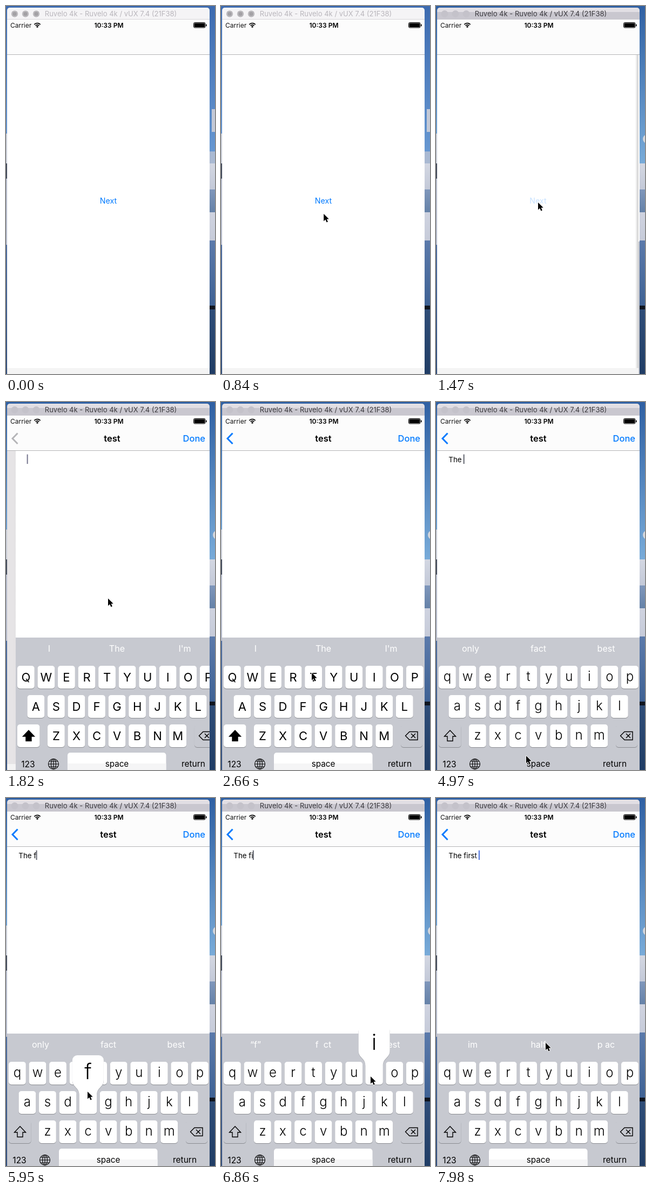
Recreate the animation shown at these times as an HTML page with a canvas. Size 387 by 678 pixels, loop 8 s.

```html
<!DOCTYPE html>
<html lang="en">
<head>
<meta charset="utf-8">
<title>Typing demo</title>
<style>
html, body { margin: 0; width: 100%; height: 100%; overflow: hidden; background: #3d6bb0; }
canvas { display: block; }
</style>
</head>
<body>
<canvas id="stage" width="387" height="678"></canvas>
<script>
const ctx = document.getElementById('stage').getContext('2d');
const LOOP = 8000, STEP = 70;
const BLUE = '#007aff', BOARD = '#c7c9d0', EDGE = '#8b8d92';
const FONT = 'Inter, Roboto, sans-serif';
const TITLE = 'Ruvelo 4k - Ruvelo 4k / vUX 7.4 (21F38)';

const clamp = v => Math.max(0, Math.min(1, v));
const ramp = (t, a, b) => clamp((t - a) / (b - a));
const ease = v => v * v * (3 - 2 * v);
const between = (t, a, b) => t >= a && t < b;
const latest = (list, t) => list.filter(e => e[0] <= t).pop();

// pointer: time, x, y of the tip
const path = [
  [70, 168, 1], [350, 191, 398], [560, 191, 398], [1190, 189, 362],
  [2310, 189, 362], [2600, 168, 499], [3150, 168, 499], [3430, 224, 546],
  [3570, 224, 546], [3780, 93, 506], [3990, 93, 506], [4410, 167, 652],
  [5390, 167, 652], [5740, 151, 541], [6230, 151, 541], [6650, 277, 513],
  [7070, 277, 513], [7490, 203, 451]
];
// held keys: from, to, letter
const presses = [
  [2730, 2940, 'T'], [3430, 3570, 'h'], [3780, 3920, 'e'],
  [5810, 6020, 'f'], [6720, 6930, 'i']
];
const typed = [
  [0, ''], [2870, 'T'], [3500, 'Th'], [3850, 'The'], [4410, 'The '],
  [5950, 'The f'], [6790, 'The fi'], [7700, 'The first ']
];
const hints = [
  [0, 'I', 'The', "I'm"], [3010, '“T”', 'The', 'This'],
  [3570, '“Th”', 'The', 'This'], [3920, '“The”', 'They', 'Then'],
  [4410, 'only', 'fact', 'best'], [6090, '“f”', 'f  ct', 'best'],
  [7000, '“fi”', 'first', 'find'], [7770, 'im', 'half', 'p ac']
];
const caretOff = [[2310, 2870], [4410, 4690], [5460, 5950], [7420, 7700]];

const rows = [['QWERTYUIOP', 5, 486], ['ASDFGHJKL', 23.5, 540], ['ZXCVBNM', 61, 594]];
const keys = rows.flatMap(([letters, x, y]) =>
  [...letters].map((letter, i) => ({ letter, x: x + 37.55 * i, y })));

function text(s, x, y, size, color, weight = 400, align = 'center') {
  ctx.font = `${weight} ${size}px ${FONT}`;
  ctx.textAlign = align;
  ctx.fillStyle = color;
  ctx.fillText(s, x, y);
}

function rect(x, y, w, h, color) {
  ctx.fillStyle = color;
  ctx.fillRect(x, y, w, h);
}

function round(x, y, w, h, r, color) {
  ctx.fillStyle = color;
  ctx.beginPath();
  ctx.roundRect(x, y, w, h, r);
  ctx.fill();
}

function line(points, color, width, close) {
  ctx.beginPath();
  points.forEach(([x, y]) => ctx.lineTo(x, y));
  if (close) ctx.closePath();
  ctx.strokeStyle = color;
  ctx.lineWidth = width;
  ctx.stroke();
}

function disc(x, y, r, color) {
  ctx.fillStyle = color;
  ctx.beginPath();
  ctx.arc(x, y, r, 0, 7);
  ctx.fill();
}

// a band whose colour runs from one tone to another
function band(x, w, y1, y2, from, to = from) {
  const g = ctx.createLinearGradient(0, y1, 0, y2);
  g.addColorStop(0, from);
  g.addColorStop(1, to);
  rect(x, y1, w, y2 - y1, g);
}

function wallpaper(active) {
  band(0, 387, 0, 290, active ? '#2f60a3' : '#3d6bb0', active ? '#78abd9' : '#6a9bd4');
  if (!active) {
    band(381, 6, 190, 232, '#c3c9d6');
    band(377, 10, 268, 290, '#a9b9d2');
  } else {
    disc(391, 245, 8, '#d3d6dc');
  }
  band(377, 10, 290, 338, '#d3d7e2', '#c3c9d8');
  band(377, 10, 338, 380, '#7f97bb', '#6582a8');
  band(377, 10, 380, 432, '#cfd3e0', '#c6cbd9');
  band(377, 10, 432, 552, '#5b7aab', '#3f6294');
  band(377, 10, 552, 559, '#10151f');
  band(377, 10, 559, 678, '#2f4d78', '#203d65');
  band(0, 2, 235, 290, '#c8ccd6');
  band(0, 2, 290, 318, '#404858');
  band(0, 2, 318, 440, '#b3b9c9');
  band(0, 2, 440, 678, '#4a6a9d', '#2d4a78');
}

function titleBar(active) {
  if (active) {
    rect(2, 3, 375, 8, '#e2dfe4');
    rect(2, 11, 375, 14, '#c9c7cf');
  } else {
    rect(2, 3, 375, 22, '#f5f4f6');
    rect(2, 24, 375, 1, '#d8d6da');
  }
  for (const x of [16, 36, 56]) {
    if (active) {
      disc(x, 14.5, 6.5, '#c4c2ca');
    } else {
      disc(x, 14.5, 6, '#a9a7ab');
      disc(x, 14.5, 5, '#d0ced2');
      disc(x, 14.5, 4, '#a3a1a5');
    }
  }
  text(TITLE, 194, 19, 13, active ? '#3b393e' : '#b9b6bc');
}

function statusBar() {
  text('Carrier', 8, 40, 12, '#111', 400, 'left');
  ctx.strokeStyle = '#000';
  ctx.lineWidth = 1.7;
  for (const r of [4.6, 7.8]) {
    ctx.beginPath();
    ctx.arc(58, 39.5, r, -Math.PI * 0.76, -Math.PI * 0.24);
    ctx.stroke();
  }
  disc(58, 38.2, 1.6, '#000');
  text('10:33 PM', 190.5, 39.5, 12, '#000', 600);
  ctx.lineWidth = 1;
  ctx.beginPath();
  ctx.roundRect(347.5, 30.5, 21.5, 9.5, 2);
  ctx.stroke();
  round(348.5, 31.5, 19.5, 7.5, 1, '#000');
  round(370, 33.5, 1.6, 4, 1, '#000');
}

function navBar(t, slide) {
  rect(2, 25, 375, 65, '#fcfcfc');
  rect(2, 89, 375, 1, '#b4b4b6');
  statusBar();
  if (t <= 1470) return;
  ctx.globalAlpha = ramp(t, 1470, 1820);
  text('test', 189.5 + slide * 0.44, 73, 16.5, '#000', 600);
  text('Done', 369, 73, 16.5, BLUE, 500, 'right');
  ctx.globalAlpha = ramp(t, 1600, 1820);
  line([[21.5, 57.5], [12, 67.2], [21.5, 77]], t < 1960 ? '#b5b5b8' : BLUE, 3);
  ctx.globalAlpha = 1;
}

function firstPage(t, slide) {
  const gone = 1 - slide / 375;
  rect(2, 90, 375, 588, '#fff');
  ctx.globalAlpha = t < 1470 ? 1 : 0.22;
  text('Next', 189.5 - 112 * gone, 364, 14.2, BLUE);
  ctx.globalAlpha = 1;
  rect(2, 90, 375, 577, `rgba(30,10,30,${0.115 * gone})`);
  rect(2, 667, 375, 11, '#f4f4f4');
}

function keyCap(x, y, w, color) {
  round(x, y + 1, w, 42, 5, EDGE);
  round(x, y, w, 42, 5, color);
}

function shiftKey(upper) {
  keyCap(5, 594, 41.5, upper ? '#fff' : BOARD);
  const arrow = [[26, 605], [36.5, 616], [31, 616], [31, 624.5], [21, 624.5], [21, 616], [15.5, 616]];
  line(arrow, '#000', 1.4, true);
  if (upper) {
    ctx.fillStyle = '#000';
    ctx.fill();
  }
}

function deleteKey() {
  keyCap(333, 594, 40, BOARD);
  line([[341.5, 615], [349, 607.5], [364, 607.5], [364, 622.5], [349, 622.5]], '#000', 1.4, true);
  line([[352, 611], [360, 619]], '#000', 1.4);
  line([[360, 611], [352, 619]], '#000', 1.4);
}

function globe() {
  ctx.strokeStyle = '#000';
  ctx.lineWidth = 1.1;
  for (const rx of [9.5, 4.5]) {
    ctx.beginPath();
    ctx.ellipse(72, 667, rx, 9.5, 0, 0, 7);
    ctx.stroke();
  }
  line([[72, 657.5], [72, 676.5]], '#000', 1.1);
  line([[62.5, 667], [81.5, 667]], '#000', 1.1);
  line([[64.5, 662], [79.5, 662]], '#000', 1.1);
  line([[64.5, 672], [79.5, 672]], '#000', 1.1);
}

function popup(key, letter) {
  const c = key.x + 15.75, top = key.y - 66;
  const half = 29, neck = 16.2;
  const shape = dy => {
    ctx.beginPath();
    ctx.moveTo(c - half + 9, top + dy);
    ctx.arcTo(c + half, top + dy, c + half, top + 40 + dy, 9);
    ctx.lineTo(c + half, top + 45 + dy);
    ctx.bezierCurveTo(c + half, top + 60 + dy, c + neck, top + 58 + dy, c + neck, top + 74 + dy);
    ctx.arcTo(c + neck, key.y + 42 + dy, c, key.y + 42 + dy, 5);
    ctx.arcTo(c - neck, key.y + 42 + dy, c - neck, key.y + dy, 5);
    ctx.lineTo(c - neck, top + 74 + dy);
    ctx.bezierCurveTo(c - neck, top + 58 + dy, c - half, top + 60 + dy, c - half, top + 45 + dy);
    ctx.arcTo(c - half, top + dy, c, top + dy, 9);
    ctx.closePath();
    ctx.fill();
  };
  ctx.fillStyle = '#9a9ca2';
  shape(1);
  ctx.fillStyle = '#fff';
  shape(0);
  text(letter, c, top + 44, letter === 'T' ? 36 : 39, '#000', 300);
}

function keyboard(t) {
  const upper = t < 3010;
  rect(2, 434, 375, 244, BOARD);
  latest(hints, t).slice(1).forEach((word, i) =>
    text(word, [64, 189.5, 315][i] + (word === 'im' ? 4 : 0), 459.5, 16, '#fff'));

  const press = presses.find(p => between(t, p[0], p[1]));
  let held = null;
  for (const key of keys) {
    const { letter, x, y } = key;
    if (press && press[2].toUpperCase() === letter) held = key;
    keyCap(x, y, 31.8, '#fff');
    if (upper) text(letter, x + 15.9, y + 29, 22, '#000');
    else text(letter.toLowerCase(), x + 15.9, y + 28, 24, '#000', 300);
  }
  shiftKey(upper);
  deleteKey();
  globe();
  if (!between(t, 4970, 5110)) {
    round(98, 646, 182.5, 44, 5, '#fff');
    rect(98, 666, 182.5, 12, '#f5f5f6');
  }
  text('123', 25, 673, 15.5, '#000');
  text('space', 189.5, 672, 15.2, '#000');
  text('return', 331, 672, 15.5, '#000');
  if (held) popup(held, press[2]);
}

function editor(t, slide) {
  if (t < 1470) return;
  ctx.save();
  ctx.translate(slide, 0);
  const g = ctx.createLinearGradient(-4, 0, 2, 0);
  g.addColorStop(0, 'rgba(0,0,0,0)');
  g.addColorStop(1, `rgba(0,0,0,${0.2 * slide / 375})`);
  rect(-4, 90, 6, 577, g);
  rect(2, 90, 375, 588, '#fff');
  const words = latest(typed, t)[1];
  text(words, 23.3, 110.5, 13.3, '#000', 400, 'left');
  if (!caretOff.some(([a, b]) => between(t, a, b))) {
    const x = 22.7 + ctx.measureText(words).width;
    ctx.globalAlpha = between(t, 4690, 4760) ? 0.5 : 1;
    rect(x, 96.5, 2, 17.5, t < 2310 ? '#76768e' : t >= 7700 ? '#4a70df' : '#62656f');
    ctx.globalAlpha = 1;
  }
  keyboard(t);
  ctx.restore();
}

function pointer(t) {
  if (t < path[0][0]) return;
  let i = path.findIndex(p => p[0] > t);
  if (i < 0) i = path.length;
  const a = path[i - 1], b = path[i] || a;
  const p = a === b ? 0 : ease(ramp(t, a[0], b[0]));
  ctx.save();
  ctx.translate(a[1] + (b[1] - a[1]) * p, a[2] + (b[2] - a[2]) * p);
  ctx.lineJoin = 'round';
  line([[0, 0], [0, 13.5], [3.2, 10.6], [5.4, 15.6], [7.8, 14.6], [5.6, 9.8], [9.6, 9.6]], '#fff', 1.6, true);
  ctx.fillStyle = '#000';
  ctx.fill();
  ctx.restore();
}

function draw(now) {
  const t = Math.floor((now % LOOP) / STEP) * STEP;
  const active = t >= 1330;
  // critically damped spring for the page push
  const s = Math.max(0, t - 1462) * 0.0138;
  let slide = 375 * (1 + s) * Math.exp(-s);
  if (slide < 0.4) slide = 0;

  wallpaper(active);
  ctx.save();
  ctx.beginPath();
  ctx.roundRect(2, 3, 375, 690, 5);
  ctx.clip();
  firstPage(t, slide);
  editor(t, slide);
  navBar(t, slide);
  titleBar(active);
  ctx.restore();
  pointer(t);
}

const start = performance.now();
function frame() {
  draw(performance.now() - start);
  requestAnimationFrame(frame);
}
frame();
</script>
</body>
</html>
```
